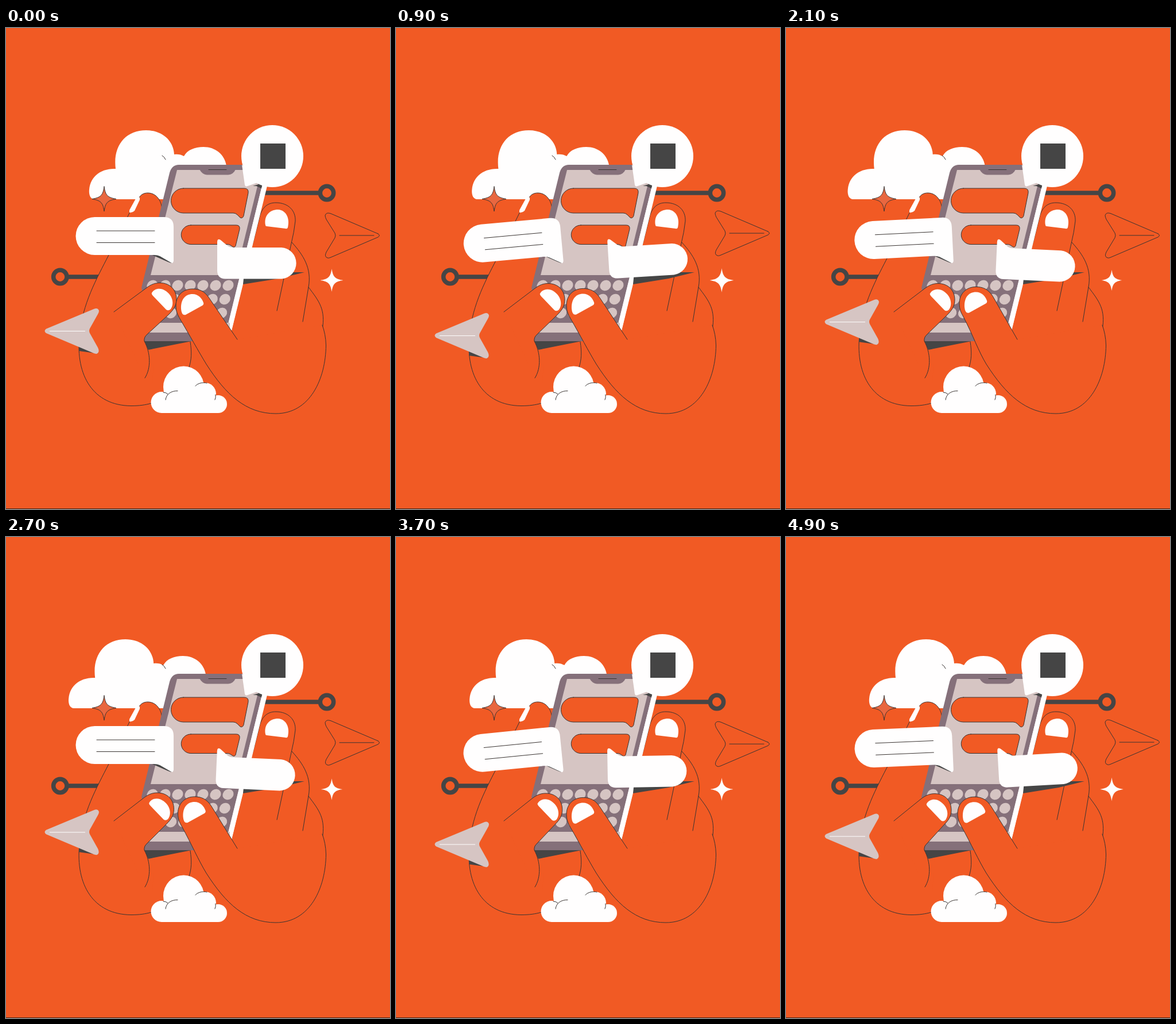
Animation, 669 px wide and 837 px high, one loop 5000 ms. Source, as an HTML page:

```html
<!DOCTYPE html>
<html lang="en">
<head>
<meta charset="utf-8">
<title>Messaging</title>
<style>
html, body { margin: 0; height: 100%; overflow: hidden; background: #f15a24; }
svg { display: block; width: 100vw; height: 100vh; }
.o { fill: #f15a24; }
.w { fill: #fffefe; }
.p { fill: #d6c5c3; }
.m { fill: #85707a; }
.d { fill: #454545; }
.l { stroke: #3a3432; stroke-width: 1; stroke-linecap: round; }
.n { fill: none; }
.bar { fill: none; stroke: #454545; stroke-width: 7.5; }
</style>
</head>
<body>
<svg viewBox="0 0 669 837">
  <rect class="o" width="669" height="837"/>
  <rect y="836" width="669" height="1" fill="#4a2415"/>

  <path id="sky" class="w" d="M154 298C147 298 144 290 145 281C147 258 166 244 191 245C186 205 208 178 244 178C272 178 292 196 293 220C299 219 305 220 310 223C316 212 329 207 344 207C365 207 381 220 384 240V260L340 298Z"/>
  <path class="l n" d="M272 222Q276 224 278 229"/>

  <g class="bar">
    <path d="M106 433H165M450 287H547"/>
    <circle cx="94.3" cy="433" r="11.7"/>
    <circle cx="559" cy="287" r="11.7"/>
  </g>

  <!-- left hand -->
  <path class="l o" d="M272 322C273 301 262 287 247 287C240 287 235 290 232 295L216 320L179 395C158 436 133 480 128 535C121 605 152 657 218 657.500C232 657.500 243 656 253 653"/>
  <path class="w" d="M215 317L226 297Q229 293 233 295V299L224 318Q220 322 215 321Z"/>
  <path class="l n" d="M321 546C324 565 323 578 319 590"/>

  <!-- right fingers -->
  <path class="l n" d="M430 375L441 332C445 312 456 304 470 304C492 304 505 318 504 336Q502 355 497 375L472 492M498 373C518 395 533 418 527 451L517 511M527 451C546 476 557 490 551 525L543 556"/>
  <path class="w" d="M452 343C449 326 460 316 474 316C488 317 495 331 491 347Q490 350 487 349L454 345Q452 345 452 343Z"/>

  <!-- phone -->
  <path class="w" d="M455 270L392 530L380 520L442 270Z"/>
  <path class="d" d="M240 544H328L248 560Z"/>
  <path class="m" d="M301 238H455L380 545H241V470L236 452L285 252Q289 238 301 238Z"/>
  <path class="w" d="M446 275H455L391 535L382 535Z"/>
  <path class="p" d="M298 247H445L400 430H252Z"/>
  <path class="m" d="M337 246Q342 255 350 255.500H387Q396 255 400 246Z"/>
  <path class="l n" d="M353 246.500H384"/>
  <g id="pad" class="p"></g>
  <path class="p" d="M240 513H390V530H240Z"/>
  <path class="l o" d="M309 279H415Q423 279 422 287L414 327Q412 332 408 330L403 325Q400 322 396 322H309A21.500 21.500 0 0 1 309 279Z"/>
  <path class="l o" d="M322 343H401Q408 343 407 350L400 379Q398 383 394 380L391 378Q389 376.500 386 376.500H322A16.700 16.700 0 0 1 322 343Z"/>

  <path class="d" d="M430 275L447 270L445 279L436 275Z"/>
  <path class="w" d="M411 238L416 273Q417 277 421 275L441 268Z"/>
  <circle class="w" cx="464" cy="223" r="54"/>
  <rect class="d" x="443" y="201" width="44" height="44"/>

  <!-- thumbs -->
  <path id="thumbL" class="l o"/>
  <path id="nailL" class="w" d="M254 461C258 453 270 451 279 458C291 467 293 480 287 489Q283 493 279 490L256 466Q253 463 254 461Z"/>
  <path id="thumbR" class="l o"/>
  <path id="nailR" class="w" d="M305 489C304 473 312 463 325 463C335 463 341 470 344 478Q345 481 342 483L313 499Q306 501 305 489Z"/>

  <!-- small cloud -->
  <g class="w">
    <circle cx="271" cy="651.500" r="18.500"/>
    <ellipse cx="309.500" cy="624.500" rx="35.500" ry="36"/>
    <circle cx="346" cy="637" r="20"/>
    <circle cx="369.500" cy="654.500" r="15.500"/>
    <path d="M271 640H365L369.500 670H271Z"/>
  </g>
  <path class="l n" d="M278 647C279 637 288 631 299 631.500M274 634Q279 634 282 637M330 623C334 618 343 616 350 618M365 638Q366 643 364 647"/>

  <!-- speech bubbles -->
  <path class="d" d="M250 393H272L290 409Q286 409 282 407Z"/>
  <path class="d" d="M415 425H520L475 436L413 446Z"/>
  <g id="talkL">
    <path class="w" d="M154.500 329H275Q292 329 292 346V405Q291 411 287 408L268 397Q264 395 258 395H154.500A33 33 0 0 1 154.500 329Z"/>
    <path class="l n" d="M158 353H259M158 373.500H259"/>
  </g>
  <path id="talkR" class="w" d="M368 373Q368 365 374 369L386 379Q390 382 396 382H480A27.300 27.300 0 0 1 480 436.500H382Q368 436 368 422Z"/>

  <!-- paper planes -->
  <g id="planeL">
    <path class="d" d="M127 550L160 566.500L127 562Z"/>
    <path class="p" d="M70 523.500L153 489Q160 486 162 492Q162 495 160 498L146 523Q144 527 146 531L160 556Q164 564 158 567Q156 567 153 566L70 531Q65 527 70 523.500Z"/>
    <path d="M76 527.500H138" stroke="#fffefe"/>
  </g>
  <path id="planeR" class="l n" d="M648 358L566 323Q558 320 556 326Q556 329 558 333L573 357Q575 361 573 365L558 390Q554 398 560 400Q562 401 566 399L648 364Q653 361 648 358ZM581 361H641"/>

  <!-- sparkles -->
  <path class="l" fill="#e9673f" d="M171 276C173 291 177 295 192 297.500C177 300 173 304 171 319C169 304 165 300 150 297.500C165 295 169 291 171 276Z"/>
  <path id="spark" class="w" d="M0-20C2-6 6-2 20 0C6 2 2 6 0 20C-2 6-6 2-20 0C-6-2-2-6 0-20Z"/>
</svg>
<script>
const LOOP = 5000, STEP = 100;
const $ = id => document.getElementById(id);
const set = (id, value, name = 'transform') => $(id).setAttribute(name, value);
const ease = k => (1 - Math.cos(Math.PI * k)) / 2;

// Cosine-eased value from a list of [time, value] pairs
function at(t, keys) {
  const i = keys.findIndex(k => k[0] > t);
  if (i < 0) return keys[keys.length - 1][1];
  const [t0, a] = keys[i - 1], [t1, b] = keys[i];
  return a + (b - a) * ease((t - t0) / (t1 - t0));
}

const SKY = [[0, 0], [2300, -38], [4900, 0]];
const TALK_L = [[0, 0], [1350, -7], [2700, 0], [4100, -7], [5450, 0]];
const TALK_R = [[0, 0], [900, -3.6], [2300, 3], [4700, -3.35]];
const SPARK = [[0, 1], [900, 1.05], [1700, 0.91], [4500, 1.02]];
const THUMB_L = [[0, 0], [900, -3], [1600, -1], [2100, -3], [3300, -6], [4200, -9], [4900, -9]];
const THUMB_R = [[0, 0], [900, 1], [1600, 1], [2100, 6], [3300, 1], [4200, 1], [4900, 3]];

// Keyboard
for (let row = 0; row < 3; row++)
  for (let col = 0; col < 7; col++) {
    const x = 255 + col * 22 - row * 5.7, y = 448 + row * 24;
    $('pad').innerHTML += `<ellipse rx="10" ry="8.800" transform="translate(${x} ${y}) rotate(-35)"/>`;
  }

function thumbs(l, r) {
  const path = (dx, dy) => (s, ...pts) => s + pts.map(([x, y]) => `${x + dx} ${y + dy}`).join(' ');
  const ly = -l * 0.35, ry = -r * 0.6;
  const L = path(l, ly), R = path(r, ry);
  set('thumbL', 'M188 494' + L('L', [245, 452]) + L('C', [253, 446], [260, 443.5], [268, 443.5]) +
    L('C', [286, 443.5], [297, 456], [297, 472]) + L('C', [297, 483], [292, 490], [284, 498]) +
    'L246 533Q240 538 241 545C252 565 253 592 242 609', 'd');
  set('thumbR', 'M403 542' + R('L', [354, 470]) + R('C', [346, 458], [337, 454], [325, 454]) +
    R('C', [308, 454], [296, 466], [296, 483]) + R('C', [296, 493], [299, 499], [303, 506]) +
    'C' + `${320 + r} 535 335 562 349 585C383 638 418 671 470 671C530 671 557 610 557.500 552Q557 533 551 517`, 'd');
  set('nailL', `translate(${l} ${ly})`);
  set('nailR', `translate(${r} ${ry})`);
}

function draw(t) {
  const wave = 2 * Math.PI * t;
  set('sky', `translate(${at(t, SKY)})`);
  set('talkL', `rotate(${at(t, TALK_L)} 291 409)`);
  set('talkR', `rotate(${at(t, TALK_R)} 369 368)`);
  set('planeL', `translate(0 ${-3.86 + 12.5 * Math.sin(wave / 3300) + 3.86 * Math.cos(wave / 3300)})`);
  set('planeR', `translate(0 ${2 * Math.cos(wave / 2000) - 2})`);
  set('spark', `translate(567.500 439) scale(${at(t, SPARK)})`);
  thumbs(at(t, THUMB_L), at(t, THUMB_R));
}

const start = performance.now();
function tick() {
  const t = (performance.now() - start) % LOOP;
  draw(Math.floor(t / STEP) * STEP);
  requestAnimationFrame(tick);
}
tick();
</script>
</body>
</html>
```
